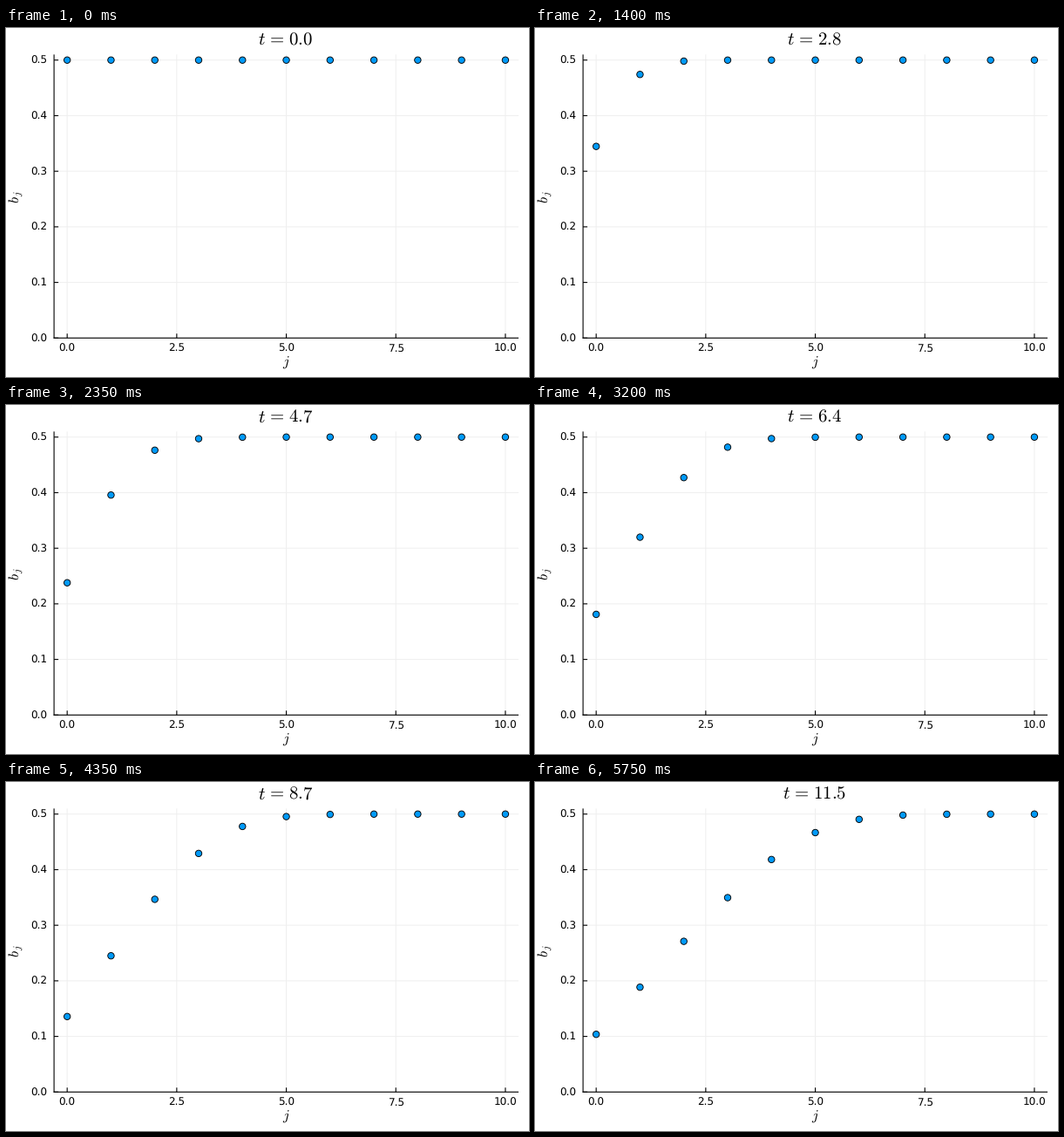
Recreate the animation shown at these times as a matplotlib script. Size 600 px wide and 400 px high, loop 5800 ms.

```python
import numpy as np
import matplotlib.pyplot as plt
from matplotlib.animation import FuncAnimation
from matplotlib.patches import Circle

plt.rcParams["font.family"] = "DejaVu Sans"
plt.rcParams["mathtext.fontset"] = "cm"
plt.rcParams["text.hinting"] = "none"

FRAMES, INTERVAL, DT = 116, 50, 0.1
PX = 0.72  # points per pixel at 100 dpi
LEFT, RIGHT, TOP, BOTTOM = 55.1, 588.0, 30.4, 355.3
COUNT, NODES = 11, 80

theta = np.arange(1, NODES) * np.pi / NODES
nodes = np.cos(theta)


def px(j):
    return LEFT + (j + 0.3) / 10.6 * (RIGHT - LEFT)


def py(b):
    return BOTTOM - b / 0.51 * (BOTTOM - TOP)


def coefficients(t):
    """Recurrence coefficients for the weight sqrt(1 - x^2) exp(t x)."""
    q = np.sin(theta) * np.exp(t * (nodes - 1) / 2)
    q /= np.linalg.norm(q)
    prev, beta, out = np.zeros_like(q), 0.0, []
    for _ in range(COUNT):
        v = nodes * q - beta * prev
        v -= (q @ v) * q
        beta = np.linalg.norm(v)
        prev, q = q, v / beta
        out.append(beta)
    return out


fig = plt.figure(figsize=(6, 4), dpi=100, facecolor="white")
ax = fig.add_axes([0, 0, 1, 1])
ax.set(xlim=(0, 600), ylim=(400, 0))
ax.axis("off")


def line(x0, y0, x1, y1, color="black", width=1.1, z=2):
    ax.plot([x0, x1], [y0, y1], color=color, lw=width * PX, zorder=z,
            solid_capstyle="butt", snap=False)


def label(x, y, text, size, **kw):
    kw = {"ha": "center", "va": "baseline", **kw}
    return ax.text(x, y, text, fontsize=size * PX, color="black", **kw)


GRID = "#efefef"
for v in np.arange(0, 10.1, 2.5):
    x = px(v)
    line(x, TOP, x, BOTTOM, GRID, 1, 1)
    line(x, BOTTOM, x, BOTTOM - 5)
    label(x, 371, f"{v:.1f}", 12)
for v in np.arange(6) / 10:
    y = py(v)
    line(LEFT, y, RIGHT, y, GRID, 1, 1)
    line(LEFT, y, LEFT + 5, y)
    label(47.4, y + 4.4, f"{v:.1f}", 12, ha="right")
line(LEFT, TOP, LEFT, BOTTOM + 0.5)
line(LEFT - 0.5, BOTTOM, RIGHT, BOTTOM)

label(321.8, 388, "$j$", 16.5)
label(15, 201, r"$b_{\hspace{0.15}j}$", 16.5, ha="left", rotation=90,
      rotation_mode="anchor")
title = label(320.7, 20, "", 20.8)

dots = [Circle((px(j), py(0.5)), 3.7, fc="#009af9", ec="black", lw=0.9 * PX,
               zorder=3)
        for j in range(COUNT)]
for dot in dots:
    ax.add_patch(dot)


def update(i):
    t = i * DT
    title.set_text(rf"$t\hspace{{0.117}}=\hspace{{0.117}}{t:.1f}$")
    for j, (dot, b) in enumerate(zip(dots, coefficients(t))):
        dot.center = px(j), py(b)
    return [title, *dots]


anim = FuncAnimation(fig, update, frames=FRAMES, interval=INTERVAL, repeat=True)
plt.show()
```
